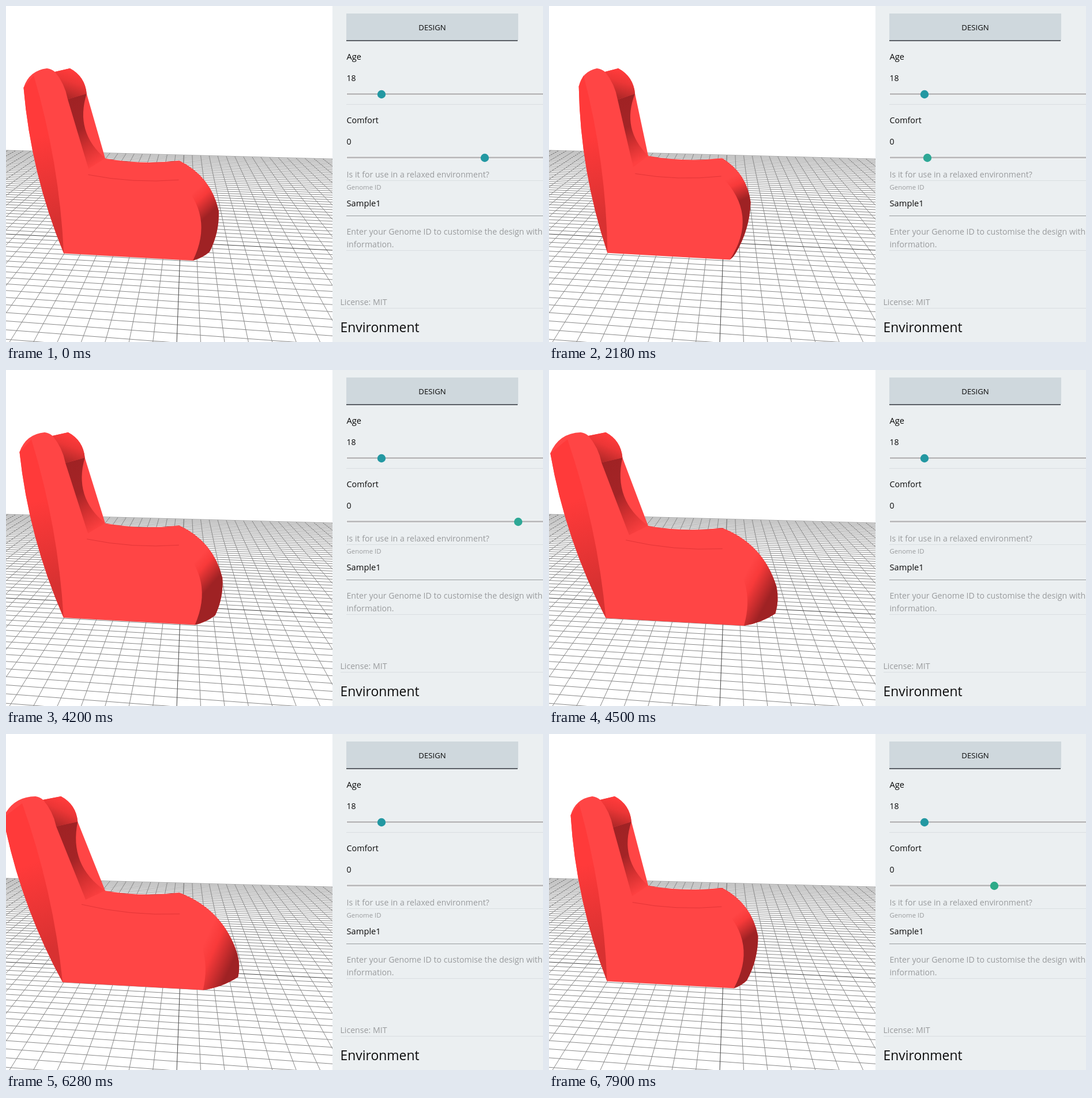
An HTML page with a canvas for the animation above (8 s loop, 931 px wide and 582 px high).

```html
<!DOCTYPE html>
<html lang="en">
<head>
<meta charset="utf-8">
<title>Chair designer</title>
<style>
  html, body { margin: 0; width: 100%; height: 100%; overflow: hidden; background: #fff; }
  canvas, svg { position: absolute; top: 0; left: 0; display: block; }
  text { font-family: "Open Sans", "Noto Sans", sans-serif; font-size: 14.17px; fill: #0a0a0a; }
  .soft { fill: #999b9d; }
  .rule { fill: #d9dee1; }
  .track { fill: #bdbdbf; stroke: #f5f7f8; stroke-width: 2px; paint-order: stroke; }
</style>
</head>
<body>
<canvas id="scene" width="566" height="582"></canvas>
<svg width="931" height="582" viewBox="0 0 931 582">
  <rect x="566" width="365" height="582" fill="#ebeff1"/>
  <rect x="590" y="13" width="298" height="47" fill="#cfd8dd"/>
  <rect x="590" y="59" width="297" height="2" fill="#5b6066"/>
  <text x="739" y="42" text-anchor="middle" style="font-size:13.2px">DESIGN</text>

  <text x="590.5" y="93" style="font-size:14.7px">Age</text>
  <text x="590.5" y="130">18</text>
  <rect class="track" x="591" y="151" width="345" height="3"/>
  <circle cx="651" cy="153" r="7.2" fill="#2398a2"/>
  <rect class="rule" x="590" y="170" width="341" height="1"/>

  <text x="590.5" y="203" style="font-size:14.3px">Comfort</text>
  <text x="590.5" y="240">0</text>
  <rect class="track" x="591" y="261" width="345" height="3"/>
  <circle id="knob" cy="263" r="7.2"/>
  <text class="soft" x="590.5" y="297">Is it for use in a relaxed environment?</text>
  <rect class="rule" x="590" y="302" width="341" height="1"/>

  <text class="soft" x="590.5" y="318" style="font-size:11.4px">Genome ID</text>
  <text x="590.5" y="347" style="font-size:14.7px">Sample1</text>
  <rect x="590" y="363" width="341" height="1" fill="#989b9e"/>
  <text class="soft" x="590.5" y="396">Enter your Genome ID to customise the design with</text>
  <text class="soft" x="590.5" y="418">information.</text>
  <rect class="rule" x="590" y="423" width="341" height="1"/>

  <text class="soft" x="579.5" y="518">License: MIT</text>
  <rect class="rule" x="580" y="523" width="351" height="1"/>
  <text x="579.5" y="565" style="font-size:22.9px">Environment</text>
</svg>
<script>
const ctx = document.getElementById('scene').getContext('2d');
const knob = document.getElementById('knob');
const LOOP = 8000, RED = '#ff4545', DARK = '#9f2224';

// [time, comfort level] pairs
const steps = [[0, 2], [1410, 1], [1870, 0], [2180, -1], [3490, 0], [3800, 1], [4030, 2],
  [4200, 3], [4430, 5], [4500, 6], [4810, 7], [4890, 8], [6280, 7], [6510, 6],
  [6660, 5], [7060, 4], [7290, 3], [7520, 2], [7900, 1]];

let level = 0;

// A point at level 0 that drifts by (dx, dy) with each level.
const at = (x, y, dx, dy) => [x + dx * level, y + dy * level];

// Curve from a to b; bulge is the control point's distance from the chord, relative to its length.
function edge(a, b, bulge = 0) {
  const dx = b[0] - a[0], dy = b[1] - a[1];
  return { a, b, c: [(a[0] + b[0]) / 2 + bulge * dy, (a[1] + b[1]) / 2 - bulge * dx] };
}

const flip = ({ a, b, c }) => ({ a: b, b: a, c });

function trace(edges) {
  ctx.beginPath();
  for (const { a, b, c } of edges) {
    ctx.lineTo(...a);
    ctx.quadraticCurveTo(...c, ...b);
  }
}

function face(fill, ...edges) {
  trace(edges);
  ctx.closePath();
  ctx.fillStyle = fill;
  ctx.fill();
}

function shade(from, to, ...stops) {
  const g = ctx.createLinearGradient(...from, ...to);
  stops.forEach(([pos, colour]) => g.addColorStop(pos, colour));
  return g;
}

function drawChair() {
  const tip = at(79, 108, -4, 0), shoulder = at(44.6, 140, -7.05, 0.7);
  const heel = at(101, 428, -0.4, 0.3), toe = at(317, 440, 3.5, 0.5);
  const corner = at(333, 428, 9.9, -1), knee = at(356, 345, 6.4, 5);
  const armTip = at(300, 265, 0, 1.4), crook = at(172, 261, 0, 1.5);
  const notch = at(93, 114, -4.1, 0), rimTip = at(117, 108, -3.1, 0);
  const rimEnd = at(146, 152, -3.1, 0), hollow = at(115, 162, -4, -0.3);
  const crotch = at(145, 280, -1, 1), crease = at(56, 120, -4, 0);
  const seamLeft = at(147, 291, -2.3, 0.6), seamRight = at(299, 297, 0.3, 2.1);

  const cap = edge(tip, shoulder, -0.32), spine = edge(shoulder, heel, -0.077);
  const rim = edge(rimTip, rimEnd, 0.27), arm = edge(crook, armTip, -0.075);
  const shin = edge(armTip, knee, 0.24), calf = edge(knee, corner, 0.13);
  const sole = edge(corner, toe, 0.11), cheek = edge(seamRight, toe, 0.39 - 0.014 * level);

  face(RED, cap, spine, flip(sole), flip(calf), flip(shin), flip(arm), flip(rim),
    edge(notch, tip, -0.15));

  face(shade(shoulder, heel, [0.3, '#ff3a3a'], [0.8, '#d83131']), spine, edge(heel, crease, -0.06));

  face(shade(at(126, 114, -3.1, 0), at(113, 158, -4, 0), [0, '#ff3b3b'], [0.4, '#ec3636'], [1, '#b02828']),
    edge(notch, rimTip), rim, edge(hollow, notch, -0.13));

  face(shade(hollow, crook, [0, DARK], [0.45, '#a42426'], [0.72, '#d33030'], [1, '#fd4040']),
    edge(hollow, rimEnd), edge(rimEnd, crook, -0.33), edge(crook, crotch));

  face(shade(at(328, 300, 2.8, 7.5), at(350, 338, 7.3, 5.5),
    [0, RED], [0.35, '#f83a3a'], [0.7, '#c92d2e'], [1, DARK]), shin, calf, sole, flip(cheek));

  trace([edge(seamLeft, seamRight, -0.07)]);
  ctx.strokeStyle = 'rgba(190, 35, 38, .45)';
  ctx.stroke();
}

// Floor plane: origin plus two vanishing points in homogeneous coordinates.
function floor(m, n) {
  const u = m * 0.0041, v = n * 0.02165, w = 1 + u + v;
  return [(302.6 - 6304 * u + 315 * v) / w, (410 + 83 * u + 83 * v) / w];
}

function floorLine(a, b, colour) {
  ctx.beginPath();
  ctx.moveTo(...floor(...a));
  ctx.lineTo(...floor(...b));
  ctx.strokeStyle = colour;
  ctx.stroke();
}

function drawFloor() {
  const far = 40, near = -24;
  ctx.lineWidth = 1;
  for (let i = -far; i <= far; i++) {
    const colour = i ? '#888' : '#444';
    floorLine([i, near], [i, far], colour);
    if (i >= near) floorLine([-far, i], [far, i], colour);
  }
}

function draw(now) {
  const t = now % LOOP;
  level = steps.filter(s => s[0] <= t).pop()[1];
  ctx.fillStyle = '#fff';
  ctx.fillRect(0, 0, 566, 582);
  drawFloor();
  drawChair();
  knob.setAttribute('cx', 714 + 58 * level);
  knob.setAttribute('fill', level === 2 ? '#2398a2' : level === 1 ? '#2daa88' : '#2ea896');
}

const start = performance.now();
function tick() {
  draw(performance.now() - start);
  requestAnimationFrame(tick);
}
tick();
</script>
</body>
</html>
```
